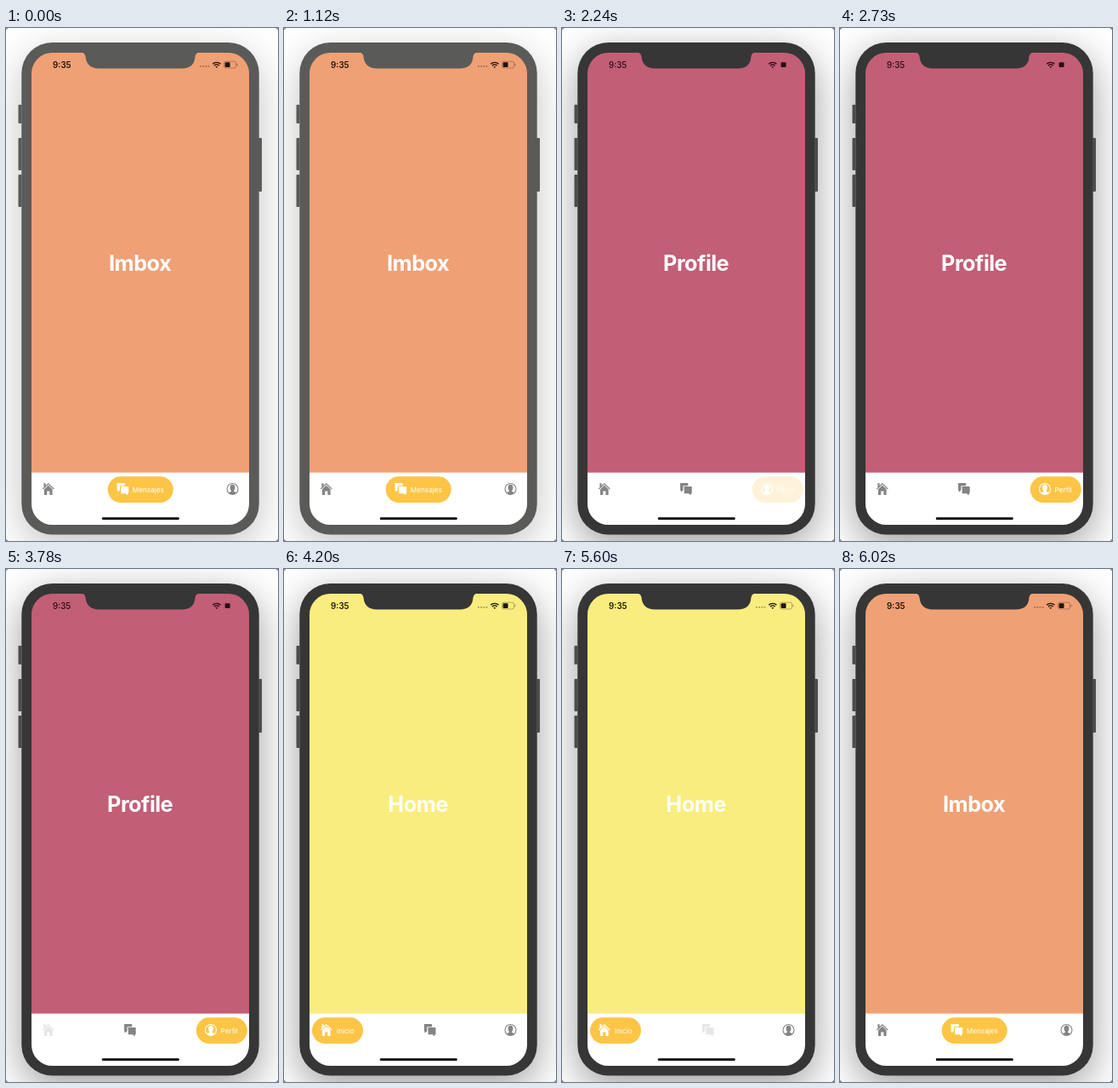
Animation, 320 px wide and 602 px high, one loop 6090 ms. Source, as an HTML page with a canvas:

```html
<!DOCTYPE html>
<html lang="es">
<head>
<meta charset="utf-8">
<title>Tab bar</title>
<style>
html, body { margin: 0; width: 100%; height: 100%; overflow: hidden; background: #fff; }
canvas { display: block; width: 320px; height: 602px; }
</style>
</head>
<body>
<canvas id="stage"></canvas>
<script>
const W = 320, H = 602, LOOP = 6090, STEP = 70;
const FONT = 'Inter, "Liberation Sans", sans-serif';
const GREY = '#848484', PILL = '#fdc546';
const canvas = document.getElementById('stage');
const dpr = window.devicePixelRatio || 1;
canvas.width = W * dpr;
canvas.height = H * dpr;
const c = canvas.getContext('2d');
c.scale(dpr, dpr);

// Each page: colours and tab positions; the active tab becomes a pill
const pages = {
  inbox:   { title: 'Imbox',   color: '#f0a075', ink: '#fff',    active: 'chat', tabs: { home: 49.8, chat: 137, user: 266.5 } },
  profile: { title: 'Profile', color: '#c25e76', ink: '#fff',    active: 'user', tabs: { home: 49.8, chat: 145.5, user: 241 } },
  home:    { title: 'Home',    color: '#faed7f', ink: '#fffef6', active: 'home', tabs: { home: 49.8, chat: 171.3, user: 266.5 } }
};
const pills = {
  home: { x: 33, w: 60, label: 'Inicio', textX: 62 },
  chat: { x: 119.7, w: 77, label: 'Mensajes', textX: 148.8 },
  user: { x: 223.8, w: 60, label: 'Perfil', textX: 252.5 }
};
const taps = [
  { down: 1960, up: 2240, tab: 'user', page: 'profile' },
  { down: 3710, up: 3920, tab: 'home', page: 'home' },
  { down: 5460, up: 5740, tab: 'chat', page: 'inbox' }
];

function box(x, y, w, h, r, fill) {
  c.beginPath();
  c.roundRect(x, y, w, h, r);
  if (fill) { c.fillStyle = fill; c.fill(); }
}

function poly(...pts) {
  c.beginPath();
  for (let i = 0; i < pts.length; i += 2) c.lineTo(pts[i], pts[i + 1]);
}

function text(str, x, y, size, weight, color, align = 'left', spacing = 0) {
  c.font = `${weight} ${size}px ${FONT}`;
  c.letterSpacing = spacing + 'px';
  c.textAlign = align;
  c.fillStyle = color;
  c.fillText(str, x, y);
  c.letterSpacing = '0px';
}

const icons = {
  home() {
    c.lineWidth = 1.2;
    poly(-6.5, 0, 0, -6.1, 6.5, 0);
    c.stroke();
    c.fillRect(-5.4, -6.8, 2.2, 4.5);
    poly(-4.8, 0.3, 0, -4.3, 4.8, 0.3, 4.8, 7, 1.6, 7, 1.6, 2.6, -1.6, 2.6, -1.6, 7, -4.8, 7);
    c.fill();
  },
  chat() {
    c.lineJoin = 'round';
    c.lineWidth = 1.2;
    poly(-6.4, -6.4, 2.2, -6.4, 2.2, -4.3, -3.6, -4.3, -3.6, 1, -5.2, 2.6, -5.2, 1, -6.4, 1);
    c.fill(); c.stroke();
    poly(-1.8, -2.4, 6.6, -2.4, 6.6, 4.6, 5.6, 4.6, 5.6, 6.4, 3.6, 4.6, -1.8, 4.6);
    c.fill(); c.stroke();
  },
  user() {
    c.lineWidth = 1.1;
    c.beginPath();
    c.arc(0, 0, 6.5, 0, 7);
    c.stroke();
    c.save();
    c.clip();
    c.beginPath();
    c.ellipse(0, -1.5, 2.9, 3.7, 0, 0, 7);
    c.fill();
    c.fillRect(-1.6, 0, 3.2, 4);
    c.beginPath();
    c.ellipse(0, 6.6, 5.2, 3.9, 0, 0, 7);
    c.fill();
    c.restore();
  }
};

function icon(name, x, color) {
  c.save();
  c.translate(x, 541);
  c.fillStyle = c.strokeStyle = color;
  icons[name]();
  c.restore();
}

function drawTab(name, page, opacity) {
  const pill = pills[name], x = pages[page].tabs[name];
  const active = name === pages[page].active;
  if (active) {
    box(pill.x, 526.3, pill.w, 30.6, 15.3, PILL);
    icon(name, x, '#fff');
    text(pill.label, pill.textX, 544.6, 8.2, 400, '#fff');
  } else {
    icon(name, x, GREY);
  }
  // The bar is white, so a white veil fades the whole tab at once
  if (opacity < 1) {
    c.fillStyle = `rgba(255,255,255,${1 - opacity})`;
    if (active) c.fillRect(pill.x - 1, 525, pill.w + 2, 33);
    else c.fillRect(x - 9, 532, 18, 18);
  }
}

function drawStatus(page) {
  const thin = page === 'profile';
  const ink = thin ? '#260d14' : '#1c1610';
  text('9:35', 55, 46.6, 9.8, thin ? 500 : 600, ink);
  if (!thin) {
    c.fillStyle = 'rgba(60,45,30,.4)';
    for (let i = 0; i < 4; i++) c.fillRect(228 + i * 3.2, 44, 1.8, 1.8);
  }
  c.strokeStyle = c.fillStyle = ink;
  c.lineWidth = 1.4;
  for (const r of [4, 6.6]) {
    c.beginPath();
    c.arc(247.8, 47, r, -Math.PI * 0.75, -Math.PI * 0.25);
    c.stroke();
  }
  c.beginPath();
  c.moveTo(247.8, 47);
  c.arc(247.8, 47, 2, -Math.PI * 0.75, -Math.PI * 0.25);
  c.fill();
  box(257.6, 40.2, 6, 5.8, 1.2, ink);
  if (!thin) {
    c.strokeStyle = 'rgba(60,45,30,.45)';
    c.lineWidth = 0.8;
    box(256.5, 39.2, 14, 7.8, 2);
    c.stroke();
    box(271.5, 41.6, 1, 3, 0.5, 'rgba(60,45,30,.45)');
  }
}

function drawPhone(light) {
  const body = light ? '#5a5b59' : '#363636';
  const side = light ? '#5a5b59' : '#4c4c4c';
  c.save();
  c.shadowColor = `rgba(0,0,0,${light ? 0.24 : 0.39})`;
  c.shadowBlur = 46 * dpr;
  c.shadowOffsetY = 13 * dpr;
  box(18.3, 17, 279.4, 577.6, 36, body);
  c.restore();
  for (const [x, y, h] of [[14.5, 90, 22], [14.5, 129, 38], [14.5, 172, 38], [297, 129, 63]])
    box(x, y, 4, h, 1, side);
  return body;
}

function drawNotch(body) {
  c.beginPath();
  c.moveTo(88, 28.5);
  c.quadraticCurveTo(93, 29, 93.5, 33.5);
  c.quadraticCurveTo(95, 47.4, 109, 47.4);
  c.lineTo(207, 47.4);
  c.quadraticCurveTo(221.5, 47.4, 222.5, 33.5);
  c.quadraticCurveTo(223, 29, 228, 28.5);
  c.closePath();
  c.fillStyle = body;
  c.fill();
}

function drawCorners() {
  c.fillStyle = '#8a8a8a';
  for (const [x, dx] of [[0, 2.5], [W, -2.5]])
    for (const [y, dy] of [[0, 2.5], [H, -2.5]]) {
      poly(x, y, x + dx, y, x, y + dy);
      c.fill();
    }
}

const ease = k => k < 0.5 ? 2 * k * k : 1 - 2 * (1 - k) * (1 - k);

function draw(t) {
  let page = 'inbox';
  const opacity = { home: 1, chat: 1, user: 1 };
  for (const tap of taps) {
    if (t < tap.down) continue;
    opacity[tap.tab] = 0.2;
    if (t >= tap.up) {
      page = tap.page;
      opacity[tap.tab] = 0.2 + 0.8 * ease(Math.min(1, (t - tap.up) / 250));
    }
  }
  const { title, color, ink } = pages[page];

  c.fillStyle = '#fff';
  c.fillRect(0, 0, W, H);
  const body = drawPhone(t < taps[0].down);

  c.save();
  box(30, 29, 256, 554, 24.5);
  c.clip();
  c.fillStyle = color;
  c.fillRect(30, 29, 256, 493);
  c.fillStyle = '#fff';
  c.fillRect(30, 521.7, 256, 62);
  for (const name in pills) drawTab(name, page, opacity[name]);
  c.restore();

  drawNotch(body);
  drawStatus(page);
  text(title, 157.6, 284.5, 25.3, 700, ink, 'center', -0.5);
  box(112.8, 574.3, 91, 2.8, 1.4, '#000');
  drawCorners();
}

const start = performance.now();
function tick() {
  const t = (performance.now() - start) % LOOP;
  draw(Math.floor(t / STEP) * STEP);
  requestAnimationFrame(tick);
}
tick();
</script>
</body>
</html>
```
